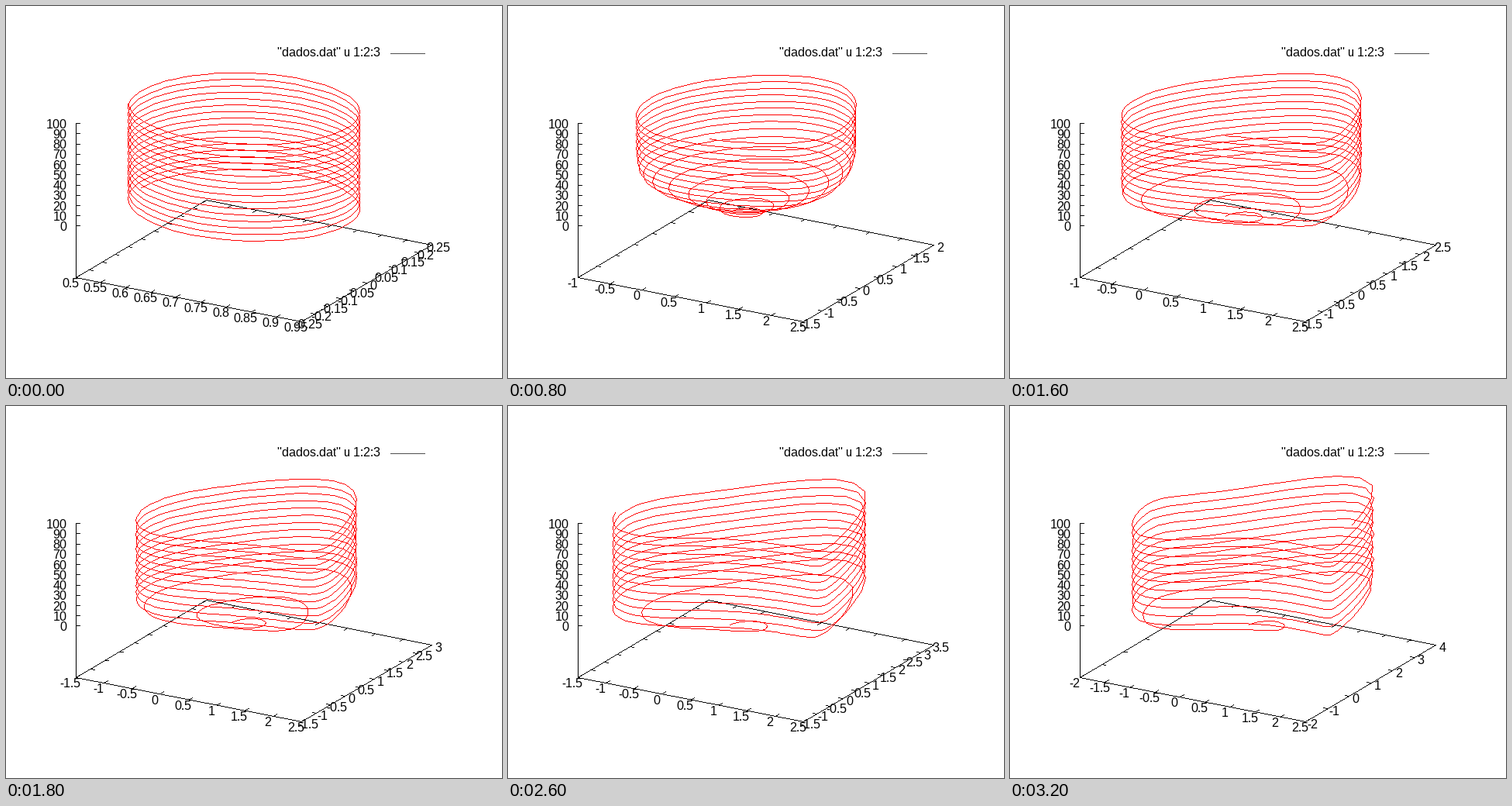
A matplotlib script that plays this animation: 640 px wide and 480 px high, repeating every 3400 ms.

```python
import numpy as np
import matplotlib.pyplot as plt
from matplotlib.animation import FuncAnimation

plt.rcParams["font.family"] = "Liberation Sans"
plt.rcParams["text.hinting"] = "default"
plt.rcParams["text.hinting_factor"] = 1

W, H, DPI = 640, 480, 100
FRAMES, INTERVAL = 17, 200
BLACK, RED, GRAY = (0, 0, 0), (255, 0, 0), (80, 80, 80)
FONT_SIZE = 16 * 72 / DPI

# Oscillator
OFFSET = 0.705
DT, T_END = 0.1, 100
DAMPING = [0, 0.05] + [0.1 * k for k in range(1, FRAMES - 1)]

# View turned by 30 degrees and tilted by 60
CENTER = np.array([320, 329.1])
SCALE = np.array([168, 57.25])
COS, SIN = np.cos(np.pi / 6), np.sin(np.pi / 6)
U_AXIS = 2 * SCALE * [COS, SIN]
V_AXIS = 2 * SCALE * [SIN, -COS]
ORIGIN = CENTER - (U_AXIS + V_AXIS) / 2
Z_TOTAL = 198.3
Z_HEIGHT = Z_TOTAL * 2 / 3
UP = np.array([0, -1])
TIC = 5


def oscillate(mu):
    """Van der Pol oscillator with a shifted rest point: x, x', t."""
    def slope(s):
        x, y = s
        return np.array([y, mu * (1 - x * x) * y - (x - OFFSET)])

    state = np.array([0.5, 0.0])
    rows = [state]
    for _ in range(round(T_END / DT)):
        k1 = slope(state)
        k2 = slope(state + DT / 2 * k1)
        k3 = slope(state + DT / 2 * k2)
        k4 = slope(state + DT * k3)
        state = state + DT / 6 * (k1 + 2 * k2 + 2 * k3 + k4)
        rows.append(state)
    x, y = np.transpose(rows)
    return x, y, np.arange(len(rows)) * DT


def axis_ranges(i):
    """(low, high, step) of x, x' and t for frame i."""
    t = (0, 100, 10)
    if i == 0:
        return (0.5, 0.95, 0.05), (-0.25, 0.25, 0.05), t
    if i == 1:
        return (0, 1.4, 0.2), (-0.8, 0.8, 0.2), t
    if i == 2:
        return (-0.5, 2, 0.5), (-1.5, 1.5, 0.5), t
    x_low = -1 if i < 9 else -1.5 if i < 16 else -2
    if i >= 14:
        y = (-2, 4, 1)
    else:
        y_high = 2 if i < 6 else 2.5 if i < 9 else 3 if i < 11 else 3.5
        y = (-1.5, y_high, 0.5)
    return (x_low, 2.5, 0.5), y, t


def tics(low, high, step):
    """Fractions along the axis and their labels."""
    n = round((high - low) / step)
    return [(k / n, f"{round(low + k * step, 6):g}") for k in range(n + 1)]


fig = plt.figure(figsize=(W / DPI, H / DPI), dpi=DPI, facecolor="white")
ax = fig.add_axes([0, 0, 1, 1])


def line(canvas, points, color=BLACK):
    """Polyline one hard-edged pixel wide."""
    pixels = np.floor(points).astype(int)
    for a, b in zip(pixels[:-1], pixels[1:]):
        n = max(abs(b - a).max(), 1)
        steps = np.linspace(0, 1, n + 1)[:, None]
        x, y = np.floor(a + (b - a) * steps + 0.5).astype(int).T
        canvas[y, x] = color


def label(pos, text, ha="center"):
    ax.text(pos[0], pos[1] + 5.5, text, fontsize=FONT_SIZE, ha=ha,
            va="baseline")


def draw_axes(canvas, x_range, y_range, z_range):
    right, back = ORIGIN + U_AXIS, ORIGIN + V_AXIS
    line(canvas, [ORIGIN, right, right + V_AXIS, back, ORIGIN])
    line(canvas, [ORIGIN, ORIGIN + Z_TOTAL * UP])

    u_tic = TIC * U_AXIS / np.hypot(*U_AXIS)
    v_tic = TIC * V_AXIS / np.hypot(*V_AXIS)
    for f, text in tics(*x_range):
        p = ORIGIN + f * U_AXIS
        line(canvas, [p, p + v_tic])
        line(canvas, [p + V_AXIS, p + V_AXIS - v_tic])
        label(p + [-7.5, 7.5], text)
    for f, text in tics(*y_range):
        p = ORIGIN + f * V_AXIS
        line(canvas, [p, p + u_tic])
        line(canvas, [p + U_AXIS, p + U_AXIS - u_tic])
        label(p + U_AXIS + [8.5, 3], text)
    for f, text in tics(*z_range):
        p = ORIGIN + (Z_TOTAL - (1 - f) * Z_HEIGHT) * UP
        line(canvas, [p, p + [TIC, 0]])
        label((78.5, p[1] + 0.5), text, ha="right")


def project(u, v, w):
    """Unit box coordinates to pixels."""
    height = Z_TOTAL - (1 - w) * Z_HEIGHT
    return (ORIGIN + np.outer(u, U_AXIS) + np.outer(v, V_AXIS)
            + np.outer(height, UP))


runs = [oscillate(mu) for mu in DAMPING]


def draw(i):
    ax.clear()
    ax.axis("off")
    canvas = np.full((H, W, 3), 255, np.uint8)

    ranges = axis_ranges(i)
    draw_axes(canvas, *ranges)
    unit = [(values - low) / (high - low)
            for values, (low, high, _) in zip(runs[i], ranges)]
    line(canvas, project(*unit), RED)

    label((483.5, 59.5), '"dados.dat" u 1:2:3', ha="right")
    line(canvas, [(496, 61), (540, 61)], GRAY)

    ax.imshow(canvas, extent=(0, W, H, 0), interpolation="nearest",
              aspect="auto")
    return []


anim = FuncAnimation(fig, draw, frames=FRAMES, interval=INTERVAL,
                     init_func=lambda: [], repeat=True, repeat_delay=0)
plt.show()
```
